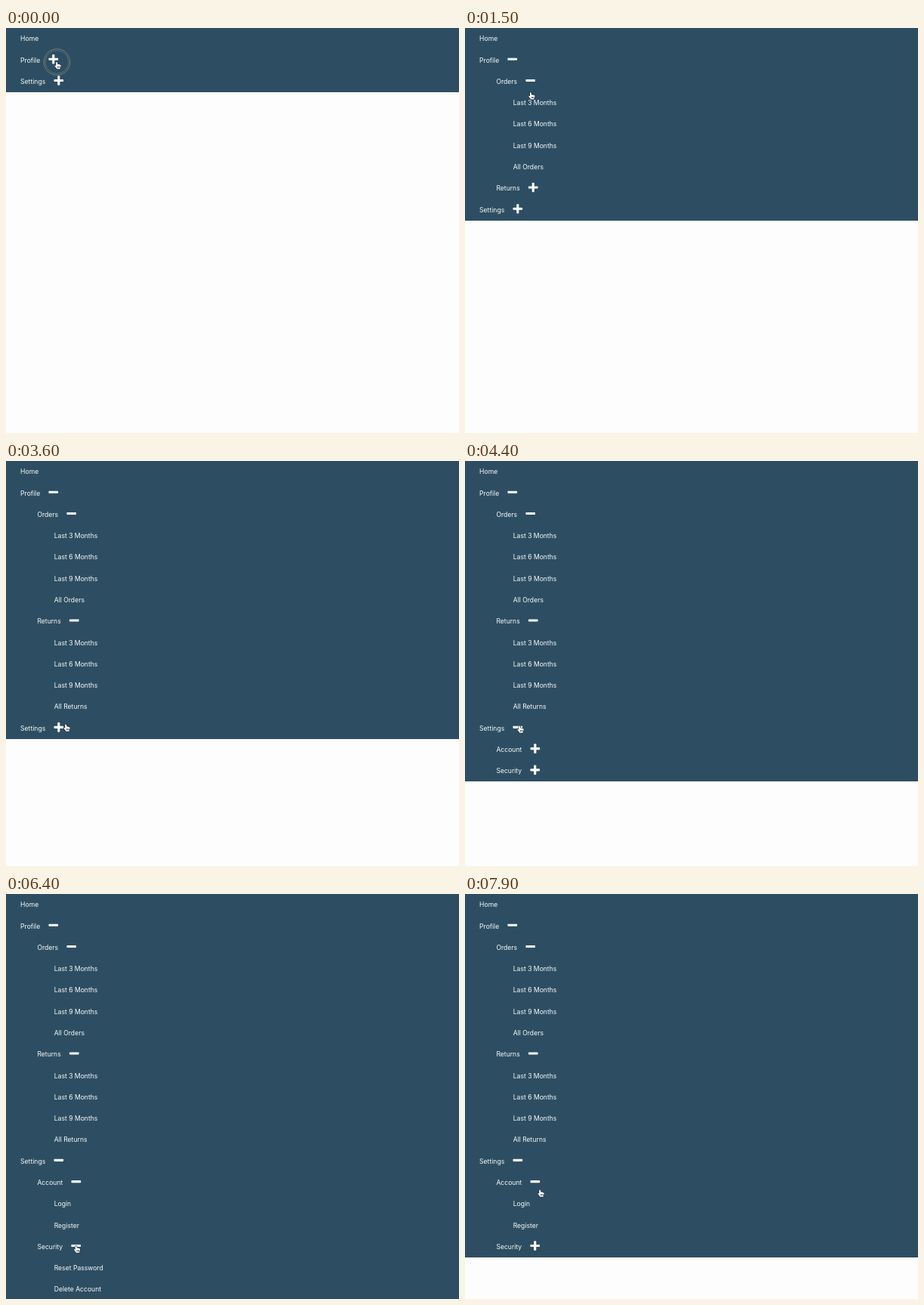
Animation of 600x536 px, one loop 8000 ms. Source, as an HTML page with a canvas:

```html
<!DOCTYPE html>
<html lang="en">
<head>
<meta charset="utf-8">
<title>Nested menu</title>
<style>
  html, body { margin: 0; width: 100%; height: 100%; overflow: hidden; background: #fdfdfd; }
  canvas { display: block; width: 600px; height: 536px; }
</style>
</head>
<body>
<canvas id="stage"></canvas>
<script>
const W = 600, H = 536, LOOP = 8000, STEP = 100, PRESS = 200;
const ROW = 28.28, LEFT = 19.1, INDENT = 22.3, ICON_GAP = 17.6;
const FONT = '8.6px Inter, "Open Sans", sans-serif';
const canvas = document.getElementById('stage');
const ctx = canvas.getContext('2d');
const dpr = window.devicePixelRatio || 1;
canvas.width = W * dpr;
canvas.height = H * dpr;

const clicks = [];
const leaf = label => ({ label });

// A group unfolds at one click and may fold again at a later one.
function group(label, opens, kids, closes = LOOP) {
  clicks.push(opens, closes);
  return { label, kids, isOpen: t => t >= opens && t < closes };
}

const months = [3, 6, 9].map(n => leaf(`Last ${n} Months`));
const menu = [
  leaf('Home'),
  group('Profile', 100, [
    group('Orders', 1300, [...months, leaf('All Orders')]),
    group('Returns', 2600, [...months, leaf('All Returns')])
  ]),
  group('Settings', 4300, [
    group('Account', 5200, [leaf('Login'), leaf('Register')]),
    group('Security', 6400, [leaf('Reset Password'), leaf('Delete Account')], 7200)
  ])
];

// Pointer moves; bow bends the way sideways.
const origin = { x: 67.5, y: 45 };
const moves = [
  { from: 300, to: 800, x: 85, y: 95 },
  { from: 800, to: 1100, x: 86.5, y: 67.5 },
  { from: 1300, to: 2200, x: 92.5, y: 209 },
  { from: 2900, to: 3600, x: 79.5, y: 348.5, bow: 8 },
  { from: 3800, to: 3900, x: 72.5, y: 350.5 },
  { from: 4500, to: 5000, x: 92, y: 377 },
  { from: 5400, to: 6200, x: 93, y: 465.5 },
  { from: 7500, to: 7900, x: 99.5, y: 391.5, bow: 6 }
];

const ease = k => k * k * (3 - 2 * k);

function pointerAt(t) {
  let { x, y } = origin;
  for (const m of moves) {
    if (t <= m.from) break;
    const k = ease(Math.min(1, (t - m.from) / (m.to - m.from)));
    x += (m.x - x) * k + (m.bow || 0) * Math.sin(Math.PI * k);
    y += (m.y - y) * k;
  }
  return { x, y };
}

function visibleRows(items, t, depth = 0) {
  return items.flatMap(({ label, kids, isOpen }) => {
    const open = !!kids && isOpen(t);
    const row = { label, depth, open, toggle: !!kids };
    return open ? [row, ...visibleRows(kids, t, depth + 1)] : [row];
  });
}

function bar(x, y, w, h) {
  ctx.beginPath();
  ctx.roundRect(x - w / 2, y - h / 2, w, h, 0.8);
  ctx.fill();
}

function drawRow({ label, depth, open, toggle }, i) {
  const x = LEFT + depth * INDENT, y = i * ROW;
  ctx.fillStyle = '#f8fafb';
  ctx.fillText(label, x, y + 17.3);
  if (!toggle) return;
  const cx = x + ctx.measureText(label).width + ICON_GAP, cy = y + 13;
  ctx.fillStyle = '#fff';
  bar(cx, cy, 12.6, 3.1);
  if (!open) bar(cx, cy, 3.1, 12.6);
}

function circle(x, y, r, color) {
  ctx.strokeStyle = color;
  ctx.lineWidth = 0.8;
  ctx.beginPath();
  ctx.arc(x, y, r, 0, Math.PI * 2);
  ctx.stroke();
}

function ring(x, y) {
  circle(x, y, 17.2, 'rgba(176,164,148,.8)');
  circle(x, y, 16.3, 'rgba(30,45,55,.6)');
  circle(x, y, 15.5, 'rgba(160,150,138,.6)');
}

const hand = new Path2D(
  'M-1.3 5.2V.9C-1.3-.3 .6-.3 .7.9L.9 3.2C1.3 2.6 2.3 2.7 2.5 3.4' +
  'C3 2.9 3.8 3.1 4 3.8C4.7 3.5 5.3 4 5.2 4.8C5.2 6.3 4.8 7 4.3 8V9.2H-.5V8.4' +
  'C-1.4 7.4-2.1 6.4-2.9 5.4C-3.3 4.5-2.2 4-1.3 5.2Z');
const creases = new Path2D('M.9 5.6V7.8M2.3 5.6V7.8M3.7 5.6V7.8');

function pointer(x, y) {
  ctx.save();
  ctx.translate(x, y);
  ctx.lineJoin = 'round';
  ctx.strokeStyle = '#14212a';
  ctx.lineWidth = 1.2;
  ctx.stroke(hand);
  ctx.fillStyle = '#fff';
  ctx.fill(hand);
  ctx.lineWidth = 0.7;
  ctx.stroke(creases);
  ctx.restore();
}

function draw(t) {
  ctx.setTransform(dpr, 0, 0, dpr, 0, 0);
  ctx.fillStyle = '#fdfdfd';
  ctx.fillRect(0, 0, W, H);
  const rows = visibleRows(menu, t);
  ctx.fillStyle = '#2d4e62';
  ctx.fillRect(0, 0, W, Math.round(rows.length * ROW));
  ctx.font = FONT;
  rows.forEach(drawRow);
  const { x, y } = pointerAt(t);
  if (clicks.some(c => c < LOOP && t >= c - PRESS && t < c)) ring(x, y);
  pointer(x, y);
}

const start = performance.now();
function tick() {
  const t = (performance.now() - start) % LOOP;
  draw(Math.floor(t / STEP) * STEP);
  requestAnimationFrame(tick);
}
tick();
</script>
</body>
</html>
```
